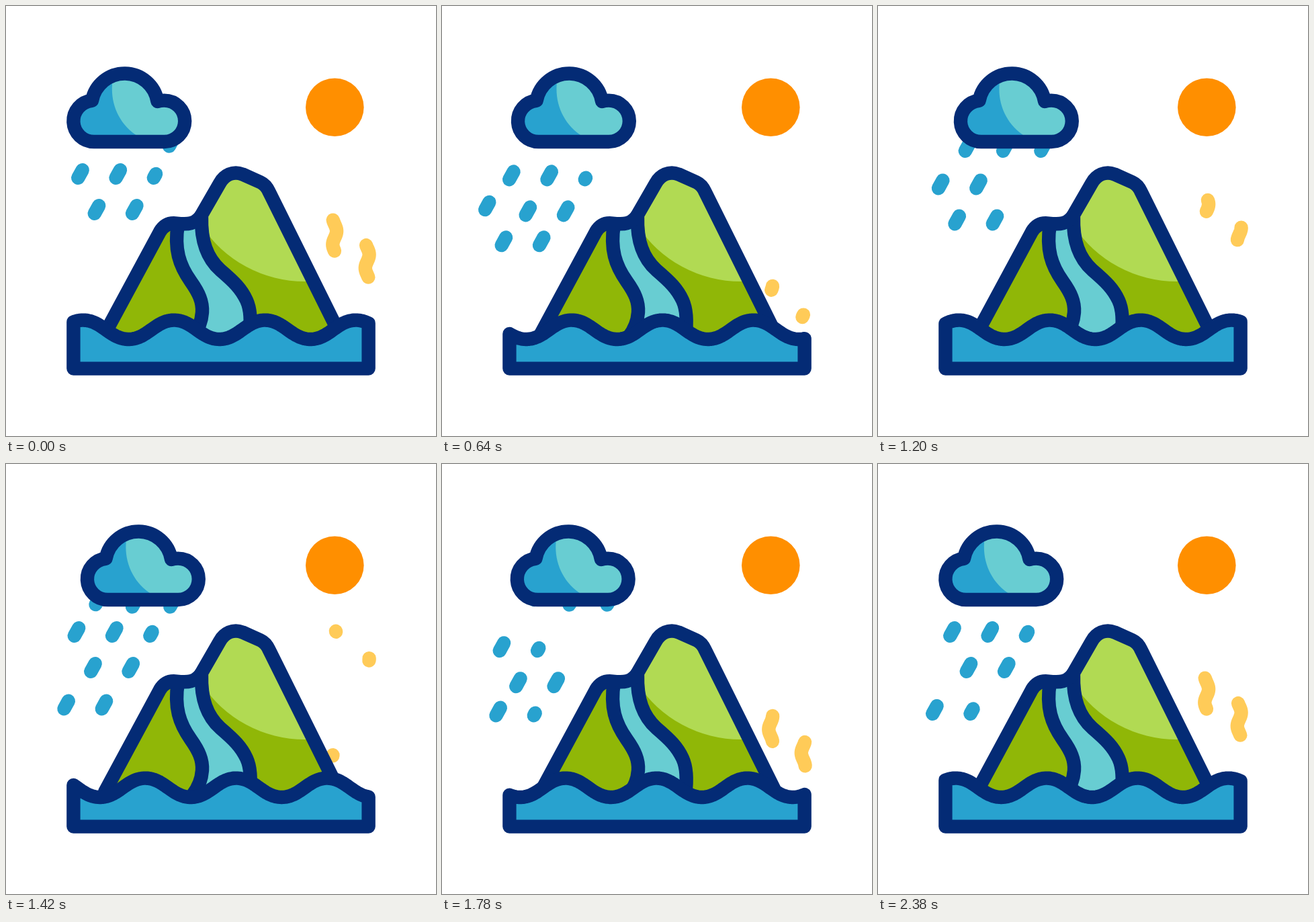
Animation of 640 by 640 pixels, one loop 2.4 s. Source, as an HTML page with a canvas:

```html
<!DOCTYPE html>
<html lang="en">
<head>
<meta charset="utf-8">
<title>Water cycle</title>
<style>
html, body { margin: 0; width: 100%; height: 100%; overflow: hidden; background: #fff; }
canvas { display: block; width: 100vw; height: 100vh; }
</style>
</head>
<body>
<canvas id="stage" width="640" height="640"></canvas>
<script>
const ctx = document.getElementById('stage').getContext('2d');
const { PI, sin, cos, min, max } = Math;
const LOOP = 2400, END = 2380;
const NAVY = '#042b75', BLUE = '#28a2cf', TEAL = '#68cdd2', GREEN = '#90b707',
  LIME = '#b1da53', ORANGE = '#ff8f00', YELLOW = '#ffcb58';

const clamp = v => max(0, min(1, v));

function fill(path, color) {
  ctx.fillStyle = color;
  ctx.fill(path);
}

function fillWithin(shape, path, color) {
  ctx.save();
  ctx.clip(shape);
  fill(path, color);
  ctx.restore();
}

function stroke(path, color = NAVY) {
  ctx.strokeStyle = color;
  ctx.lineWidth = 20.4;
  ctx.stroke(path);
}

// Symmetric cubic-bezier(a, 0, 1 - a, 1), solved by bisection.
function ease(x, a = 0.44) {
  let lo = 0, hi = 1;
  for (let i = 0; i < 24; i++) {
    const m = (lo + hi) / 2, n = 1 - m;
    const bx = 3 * a * m * n * n + 3 * (1 - a) * m * m * n + m * m * m;
    if (bx < x) lo = m; else hi = m;
  }
  return lo * lo * (3 - 2 * lo);
}

/* Rain: each shower is three drops over two. A drop hangs under the cloud,
   falls with the shower, and grows and shrinks at its own heights. */
const SHOWERS = [[0, 110.5], [380, 100.5], [627, 105], [1115, 104], [1420, 105],
  [1658, 104.5], [2034, 104], [END, 110.5]]; // [time, x] on passing y = 250
const DROPS = [
  { col: 0, row: 0, born: 201, dies: 305 },
  { col: 1, row: 0, born: 192, dies: 275 },
  { col: 2, row: 0, born: 173, dies: 254 },
  { col: 0, row: 1, born: 241, dies: 346 },
  { col: 1, row: 1, born: 231, dies: 318 }
];

function drawRain(t) {
  const path = new Path2D();
  for (const [at, x] of SHOWERS) {
    const fall = 250 + 0.182 * (t - at);
    const y = max(fall, 203);
    for (const { col, row, born, dies } of DROPS) {
      const grown = clamp((fall - born) / 8), left = clamp((dies - fall) / 8);
      if (!grown || !left) continue;
      const cx = x - 0.7 * (y - 250) + 56.3 * col + 24.5 * row;
      const cy = y + 53 * row;
      const from = 1 - 2 * left, to = max(from + 0.02, 2 * grown - 1);
      path.moveTo(cx - 3.2 * from, cy + 5.8 * from);
      path.lineTo(cx - 3.2 * to, cy + 5.8 * to);
    }
  }
  stroke(path, BLUE);
}

/* Steam: puffs climb a sine-shaped track, longest halfway up. */
const PUFFS = [
  { at: 570, life: 860, size: 0.12, lag: 0 },
  { at: 1410, life: 1460, size: 0.28, lag: 0.17 }
];

function drawPuff(path, { life, size, lag }, age, dx, dy) {
  const a = age / life;
  if (a < 0 || a > 1) return;
  const mid = a - lag * sin(PI * a * a), half = size / 2 * sin(PI * a);
  for (let i = 0; i <= 24; i++) {
    const y = 435 - 188 * clamp(mid + half * (1 - i / 12)) + i / 200;
    path.lineTo(489.2 + dx + 2.9 * cos(2 * PI * (y - 335) / 40), y + dy);
  }
}

function drawSteam(t) {
  for (const column of [0, 1]) {
    for (const puff of PUFFS) {
      for (const time of [t, t + END]) {
        const path = new Path2D();
        drawPuff(path, puff, time - puff.at - 30 * column, 48.5 * column, 35 * column);
        stroke(path, YELLOW);
      }
    }
  }
}

const cloud = new Path2D('M131 202 A30.7 30.7 0 0 1 128 140.75 A49.5 49.5 0 0 1 225.5 142 ' +
  'Q230 140.6 235.5 140.6 A30.7 30.7 0 0 1 235.5 202 Z');
const cloudLight = new Path2D('M158 90 V118 C156 148 170 178 197 194 L212 204 H280 V90 Z');

function drawCloud(t) {
  ctx.save();
  ctx.translate(11.3 * (1 - cos(2 * PI * t / END)), 0);
  fill(cloud, BLUE);
  fillWithin(cloud, cloudLight, TEAL);
  stroke(cloud);
  ctx.restore();
}

const hill = new Path2D('M147 488 L229 336 C236 324 246 322.5 254 323.5 C270 325.5 283 325 291.5 310 ' +
  'L318 264 C325 251.5 338 245 352 250.4 L378.5 262.3 C384.5 265 388.7 270 391.8 277 L498 491');
const hillLight = new Path2D('M291 327 A184 184 0 0 0 445 410 H470 L391 270 L345 240 L291 310 Z');
const leftBank = 'M256 325 C250 362 258 386 275 410 C287 427 293 440 292 456 C291 470 286 482 278 492';
const rightBank = 'M291 314 C290 350 299 375 319 393 C340 411 350 421 358 438 C364 451 365 470 362 492';
const banks = new Path2D(leftBank + rightBank);
const stream = new Path2D(leftBank + ' L362 492 C365 470 364 451 358 438 ' +
  'C350 421 340 411 319 393 C299 375 290 350 291 314 Z');

function drawHill() {
  fill(hill, GREEN);
  fillWithin(hill, hillLight, LIME);
  fill(stream, TEAL);
  stroke(banks);
  stroke(hill);
}

// The swell runs four wavelengths to the right per loop.
function drawSea(t) {
  const shift = 542 * ease(clamp(t / 2375));
  const sea = new Path2D();
  sea.moveTo(100.4, 539.6);
  for (let i = 0; i <= 180; i++) {
    const x = 100.4 + 439.2 * i / 180;
    const c = cos(2 * PI * (x - 182.5 - shift) / 135.3);
    sea.lineTo(x, 481.8 + 14.2 * c * (1.08 - 0.08 * c * c));
  }
  sea.lineTo(539.6, 539.6);
  sea.closePath();
  fill(sea, BLUE);
  stroke(sea);
}

const sun = new Path2D();
sun.arc(489.3, 150.7, 43.3, 0, 2 * PI);

function draw(t) {
  ctx.fillStyle = '#fff';
  ctx.fillRect(0, 0, 640, 640);
  ctx.lineCap = ctx.lineJoin = 'round';
  fill(sun, ORANGE);
  drawRain(t);
  drawCloud(t);
  drawSteam(t);
  drawHill();
  drawSea(t);
}

let start;
function tick(now) {
  start ??= now;
  draw(min((now - start) % LOOP, END));
  requestAnimationFrame(tick);
}
draw(0);
requestAnimationFrame(tick);
</script>
</body>
</html>
```
